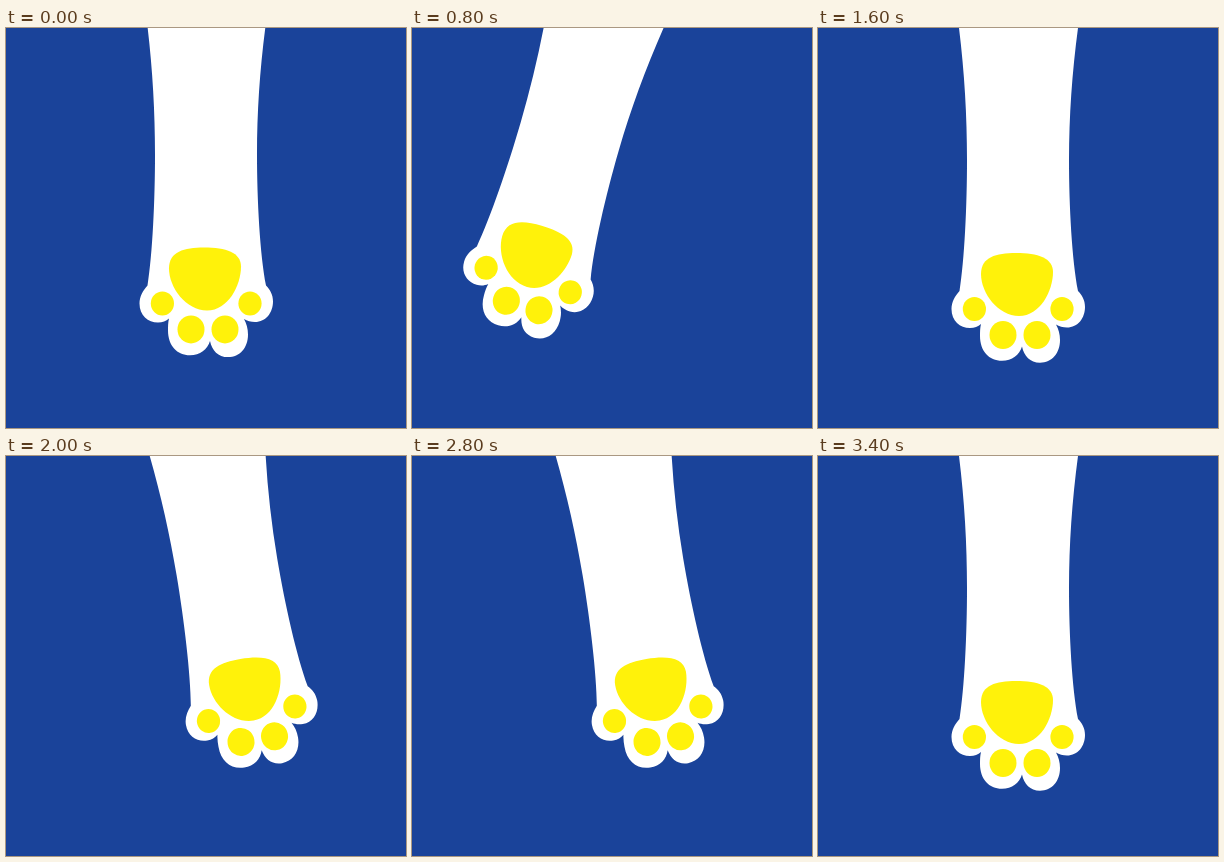
Write an HTML page that moves like this. It is 400 by 400 pixels and loops after 3.6 s.

```html
<!DOCTYPE html>
<html lang="en">
<head>
<meta charset="utf-8">
<title>Waving paw</title>
<style>
  html, body { margin: 0; width: 100%; height: 100%; overflow: hidden; background: #1a439a; }
  svg { display: block; width: 100vw; height: 100vh; }
  .fur { fill: #fff; }
  .pads { fill: #fff20a; }
</style>
</head>
<body>
<svg viewBox="0 0 400 400">
  <g id="arm">
    <path class="fur" d="M133.800-60 L141 0
      C146.500 45 149 88 149 132 C149 178 146.500 232 141.500 263
      C137 268 133.500 274 133.500 281 C133.500 293 142 300 152 300
      C156.500 300 160 298.500 163 296
      C162 300 162 304 162 308 C162 323 171 332.800 184 332.800
      C194 332.800 201.500 327 204 318.500
      C206 328 212 334.700 222 334.700 C234 334.700 242 325 242 312
      C242 306 240.500 301 238 296.500
      C241 298.500 245 299.500 249 299.500 C260 299.500 267 290 267 279
      C267 272 264 267 260 263
      C254 232 251 178 251 132 C251 88 254 45 260 0 L267.200-60 Z"/>
    <g class="pads">
      <path d="M163 246 C163 229 178 225 198 225 C220 225 235 230 235 244
        C235 263 222 288 201 288 C180 288 163 265 163 246 Z"/>
      <ellipse cx="156.400" cy="281" rx="11.600" ry="12"/>
      <ellipse cx="185" cy="307" rx="13.500" ry="14"/>
      <ellipse cx="219" cy="307" rx="13.500" ry="14"/>
      <ellipse cx="244" cy="281" rx="11.600" ry="12"/>
    </g>
  </g>
</svg>
<script>
  const STEP = 200;

  // Paw centre x, y and arm angle in degrees
  const poses = {
    lift: [200, 275.4, 0],
    rest: [200, 281, 0],
    left1: [191, 278.4, 2],
    left2: [174.8, 271.3, 5.4],
    left3: [153.4, 266, 10],
    left4: [116, 252, 16.2],
    right1: [224, 269.4, -5],
    right2: [245.5, 257.8, -9.5],
    right3: [279.6, 254, -15.5],
    right4: [323.8, 227.3, -24.7]
  };

  const order = [
    'lift', 'left1', 'left2', 'left3', 'left4', 'left4', 'left3', 'left2',
    'rest', 'right1', 'right2', 'right3', 'right4', 'right3', 'right2', 'right2',
    'right1', 'rest'
  ];

  const arm = document.getElementById('arm');

  function draw() {
    const slot = Math.floor(performance.now() / STEP) % order.length;
    const [x, y, angle] = poses[order[slot]];
    arm.setAttribute('transform', `translate(${x} ${y}) rotate(${angle}) translate(-200 -281)`);
    requestAnimationFrame(draw);
  }
  draw();
</script>
</body>
</html>
```
